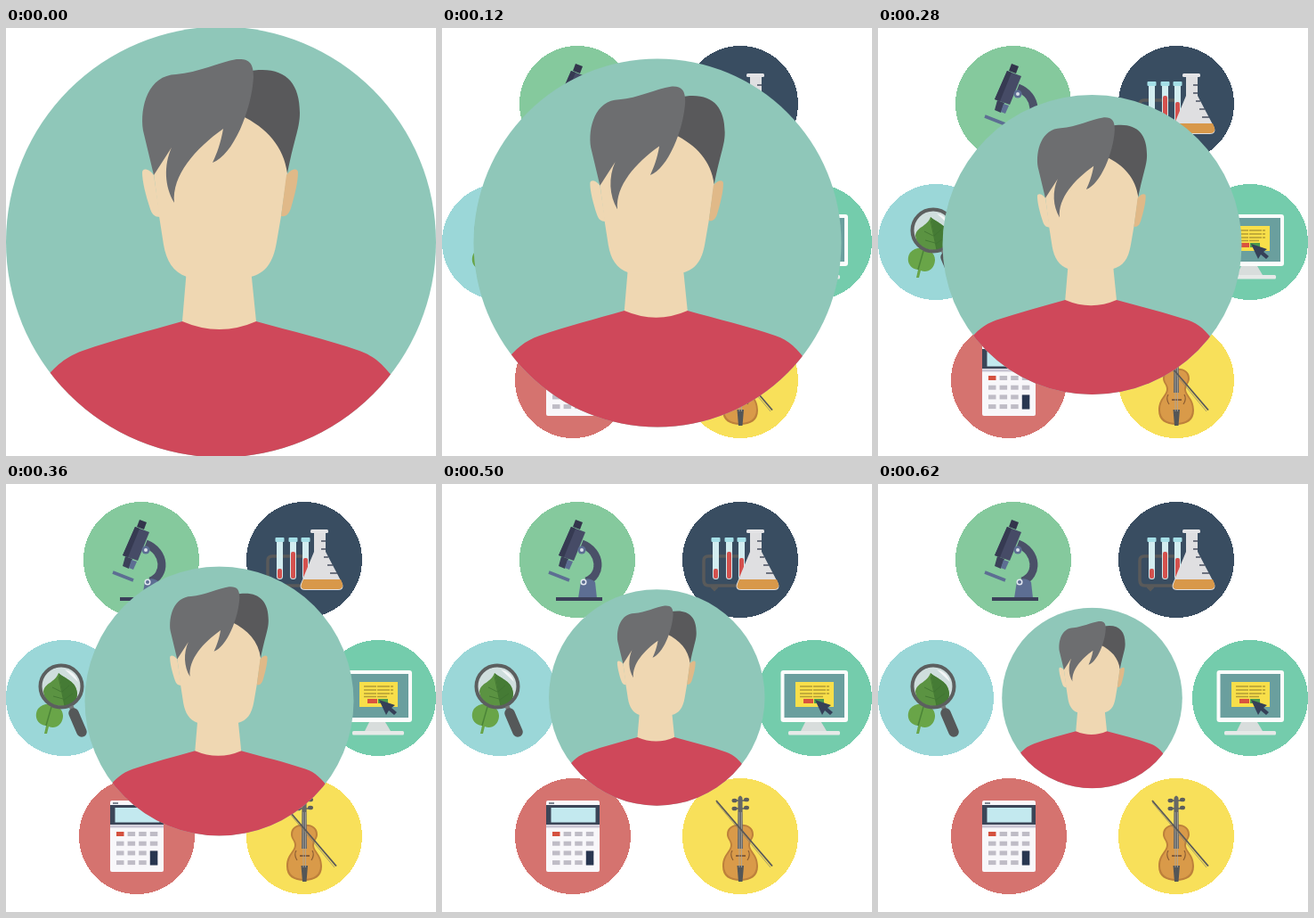
An HTML page that plays this animation: 483 by 480 pixels, repeating every 0.64 s.

```html
<!DOCTYPE html>
<html lang="en">
<head>
<meta charset="utf-8">
<title>Student and subjects</title>
<style>
html, body { margin: 0; width: 100%; height: 100%; overflow: hidden; background: #fff; }
svg { display: block; width: 483px; height: 480px; }
#icons > g > circle:first-child { shape-rendering: crispEdges; }
</style>
</head>
<body>
<svg viewBox="0 0 483 480">
  <defs>
    <clipPath id="disc"><circle cx="241.5" cy="240" r="241.5"/></clipPath>
  </defs>

  <g id="icons">
    <g id="microscope">
      <circle cx="152" cy="85" r="65" fill="#85c99d"/>
      <path d="M157 67C180 76 180 103 162 109" fill="none" stroke="#4a5068" stroke-width="9"/>
      <path d="M153 128L156 109Q164 103 172 110L174 128Z" fill="#5d6e93"/>
      <path d="M128 127H180V131H128Z" fill="#3b4059"/>
      <path d="M120 99L143 108" stroke="#5d6e93" stroke-width="3.500"/>
      <path d="M150 40L158 43L155 51L147 48Z" fill="#33354c"/>
      <path d="M145 48L161 54L148 86L131 80Z" fill="#464b66"/>
      <path d="M145 48L150 50L137 82L131 80Z" fill="#363a52"/>
      <path d="M134 81L142 84L138 95L131 92Z" fill="#3b4059"/>
      <path d="M141 85L147 87L143 96L138 94Z" fill="#5d6e93"/>
      <circle cx="157" cy="74" r="4.500" fill="#5d6e93"/>
      <circle cx="157" cy="74" r="2" fill="#d9dee8"/>
      <circle cx="159" cy="110" r="3.500" fill="#e4e8f0"/>
      <circle cx="159" cy="110" r="2" fill="#5d6e93"/>
    </g>

    <g id="chemistry">
      <circle cx="335" cy="85" r="65" fill="#394d61"/>
      <path d="M340 81H299Q294 81 294 86V108Q294 114 300 114H336M303 115L306 118L309 115" fill="none" stroke="#595a5a" stroke-width="3.500"/>
      <g id="tubes"></g>
      <path d="M346 54H359V76L378 112Q380 119 373 119H336Q329 119 331 112L346 76Z" fill="#dfdfe1"/>
      <path d="M334 107H376L378 112Q379 118 373 118H336Q330 118 332 112Z" fill="#d8984a"/>
      <rect x="342" y="51" width="20" height="4" rx="1.500" fill="#e4e4e6"/>
      <path d="M354 64H359M354 73H359M357 82H362M361 91H367M364 100H372" stroke="#4a5060" stroke-width="1.500"/>
    </g>

    <g id="biology">
      <circle cx="65" cy="240" r="65" fill="#9bd7d8"/>
      <path d="M36 252C44 242 65 247 64 261C63 271 55 275 48 272L46 280L43 280L45 271C35 270 31 260 36 252Z" fill="#69a548"/>
      <path d="M51 250L45 271" stroke="#4c8438" stroke-width="1.500"/>
      <circle cx="62" cy="227" r="24" fill="#cfdedd"/>
      <path d="M66 208A20 20 0 0 1 81 222C76 217 71 213 66 208Z" fill="#f3f6f6"/>
      <path d="M59 212C67 219 79 221 80 235C80 245 72 249 65 249C53 250 43 244 42 233C43 223 55 223 59 212Z" fill="#5b9342"/>
      <path d="M59 212C67 219 79 221 80 235C80 245 72 249 66 249Z" fill="#457b35"/>
      <path d="M59 216L66 249M62 233L52 228M64 241L53 238M63 233L71 226M65 242L75 235" stroke="#3f7332" stroke-width=".8" fill="none"/>
      <circle cx="62" cy="227" r="23.500" fill="none" stroke="#5c5f5f" stroke-width="4"/>
      <path d="M73 249L78 261" stroke="#757878" stroke-width="5"/>
      <path d="M76 257L85 278" stroke="#555859" stroke-width="11.500" stroke-linecap="round"/>
    </g>

    <g id="computing">
      <circle cx="418" cy="240" r="65" fill="#74ccac"/>
      <rect x="380.500" y="209" width="75.500" height="58" rx="3" fill="#fbfcfb"/>
      <rect x="384.500" y="213" width="67.500" height="49" fill="#6a9f9e"/>
      <rect x="397" y="222" width="43" height="28" fill="#f8df4a"/>
      <path d="M402 227H435M402 231H435M402 235H435M402 238.500H428" stroke="#b29c36" stroke-width="1.300" stroke-dasharray="14 1"/>
      <rect x="406" y="241" width="11" height="5" fill="#d9533f"/>
      <rect x="418" y="241" width="11" height="5" fill="#4d9a4d"/>
      <path d="M419 242L437 248L433 251L439 256L436 259L430 254L427 259Z" fill="#354058"/>
      <path d="M408 267H426L432 277H403Z" fill="#d8dddc"/>
      <rect x="389" y="277" width="58" height="4.500" rx="1.500" fill="#e6e9e8"/>
    </g>

    <g id="maths">
      <circle cx="147" cy="395" r="65" fill="#d5736f"/>
      <rect x="117" y="355" width="60" height="80" rx="2" fill="#f8f7fa"/>
      <rect x="117" y="360" width="60" height="22" fill="#3b4557"/>
      <rect x="122.500" y="363" width="50" height="16.500" fill="#c3e9ef"/>
      <path d="M117 384H177" stroke="#c9c5d3" stroke-width="3"/>
      <path d="M120 358H126" stroke="#56606e" stroke-width="1.500"/>
      <g id="keys"></g>
    </g>

    <g id="music">
      <circle cx="335" cy="395" r="65" fill="#f8e05a"/>
      <path d="M328 355H342M328 364H342" stroke="#5c5d5d" stroke-width="1.500"/>
      <g fill="#5c5d5d">
        <ellipse cx="328.500" cy="355" rx="3" ry="2.300"/><ellipse cx="342" cy="354" rx="3" ry="2.300"/>
        <ellipse cx="328.500" cy="364" rx="3" ry="2.300"/><ellipse cx="342" cy="363" rx="3" ry="2.300"/>
      </g>
      <path d="M335 382C343 381 350 385 350 393C350 398 346 400 346 405C346 412 355 415 355 429C355 440 347 445 335 445C323 445 315 440 315 429C315 415 324 412 324 405C324 400 320 398 320 393C320 385 327 381 335 382Z" fill="#bd803b"/>
      <path d="M335 384C342 383 348 386 348 393C348 398 344 400 344 405C344 412 353 416 353 428C353 438 346 443 335 443C324 443 317 438 317 428C317 416 326 412 326 405C326 400 322 398 322 393C322 386 328 383 335 384Z" fill="#d99a49"/>
      <path d="M326 411Q323 416 327 422M344 411Q347 416 343 422" fill="none" stroke="#8b5d33" stroke-width="1.200"/>
      <path d="M332.500 352Q335 347 337.500 352L338 409H332Z" fill="#666767"/>
      <path d="M330 417H341" stroke="#6c4930" stroke-width="1.500"/>
      <path d="M331.500 428H339L337.500 446H333Z" fill="#545657"/>
      <path d="M334 368V430M336.500 368V430" stroke="#a9a6a0" stroke-width=".8"/>
      <path d="M308 355L371 428.500" stroke="#58585a" stroke-width="1.800"/>
      <path d="M308 357L369 430" stroke="#8a846a" stroke-width=".7"/>
    </g>
  </g>

  <g id="avatar">
    <g clip-path="url(#disc)">
      <path d="M-1 -2H484V482H-1Z" fill="#8fc7b9"/>
      <path d="M40 398C56 378 67 369 86 362C123 349 160 340 198 329H281C320 340 360 349 397 362C414 368 425 378 441 400V482H40Z" fill="#cf485a"/>
    </g>
    <path d="M203 270L198 329Q240 347 281 329L275 270Z" fill="#efd7b2"/>
    <path d="M166 163L190 110L267 90C294 104 313 128 316 162L309 211L304 240C300 264 291 275 275 279H203C188 274 180 261 177 243L172 211Z" fill="#efd7b2"/>
    <path d="M153 162C153 157 160 157 166 165L173 212C167 212 164 209 162 203C157 188 153 172 153 162Z" fill="#efd7b2"/>
    <path d="M328 162C328 157 321 157 315 165L309 211C315 212 318 208 320 202C325 185 328 172 328 162Z" fill="#e0b988"/>
    <path d="M270 49C310 41 330 58 330 95C330 112 325 119 316 163C312 133 293 112 264 98Z" fill="#59595b"/>
    <path d="M166 165L154 115C150 88 160 53 191 52C216 50 240 38 259 35C273 34 278 39 278 55C276 92 255 143 232 151C237 140 241 130 244 113C213 135 186 165 189 196C178 178 177 154 186 134Z" fill="#6d6e70"/>
  </g>
</svg>
<script>
const $ = id => document.getElementById(id);
const rect = (x, y, w, h, fill, rx = 0) =>
  `<rect x="${x}" y="${y}" width="${w}" height="${h}" rx="${rx}" fill="${fill}"/>`;

$('tubes').innerHTML = [[303, 95], [318, 76], [332, 83]].map(([x, level]) =>
  rect(x + 1, 62, 7, 45, '#d3edf0', 3.5) +
  rect(x + 2, level, 5, 106 - level, '#d4514e', 2) +
  rect(x - 0.5, 60, 10, 5, '#a5dfe7', 1)).join('');

let keys = '';
for (let row = 0; row < 4; row++) {
  for (let col = 0; col < 4; col++) {
    const fill = row + col === 0 ? '#d4513f' : '#bfbcc6';
    keys += rect(124 + col * 12.6, 390 + row * 10.7, 8.5, 5, fill);
  }
}
$('keys').innerHTML = keys + rect(161.8, 411.5, 8.5, 16, '#283650');

// time, centre x, centre y, radius
const path = [
  [0, 241.5, 240, 241.5], [120, 242, 241, 206.5], [200, 241.5, 242.5, 185],
  [360, 239.5, 243.5, 151], [440, 242.5, 239.3, 134.3], [540, 240.5, 239.5, 112.5],
  [620, 240.5, 240, 101.3]
];
const LOOP = 640, STEP = 20;

function pose(time) {
  const i = Math.max(1, path.findIndex(p => p[0] >= time));
  const a = path[i - 1], b = path[i];
  const k = (time - a[0]) / (b[0] - a[0]);
  return a.map((v, n) => v + (b[n] - v) * k);
}

function draw() {
  const time = Math.floor(performance.now() % LOOP / STEP) * STEP;
  const [, x, y, r] = pose(time);
  $('avatar').setAttribute('transform',
    `translate(${x} ${y}) scale(${r / 241.5}) translate(-241.5 -240)`);
  $('icons').style.display = time ? '' : 'none';
  requestAnimationFrame(draw);
}
draw();
</script>
</body>
</html>
```
